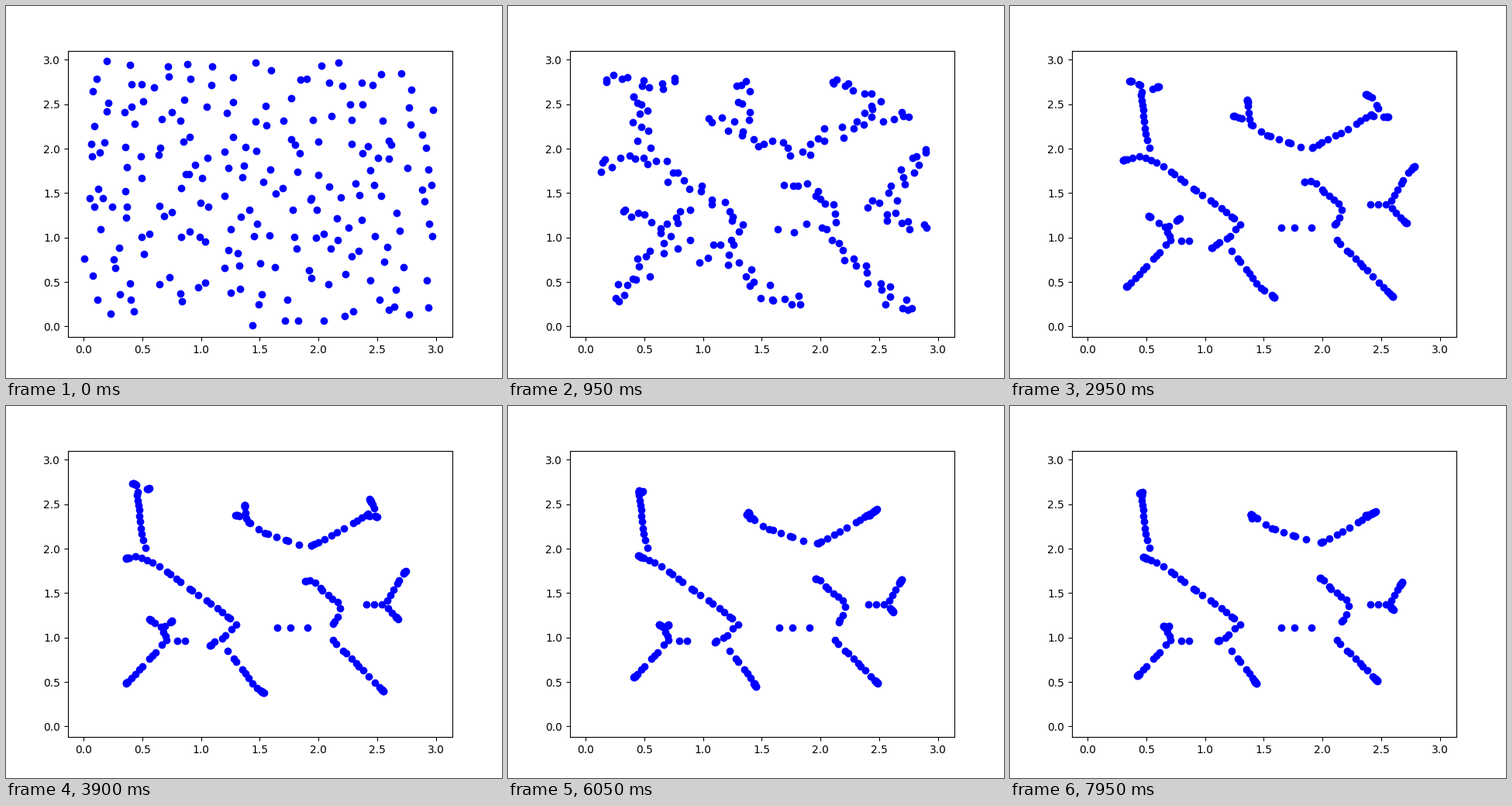
A matplotlib script for the animation above (8000 ms loop, 640 by 480 pixels).

```python
import numpy as np
import matplotlib.pyplot as plt
from matplotlib.animation import FuncAnimation

FRAMES, STEP = 160, 50
SPAN = 8.0     # seconds over which the strands contract
SETTLE = 1.75  # seconds until the scattered dots have reached their strands

rng = np.random.default_rng(7)
strands = []


def strand(*path, head=0, tail=0, drift=(0, 0), gap=0.065):
    """Add a line of dots along path; its ends retreat by head and tail."""
    x, y = np.array(path).T
    length = np.concatenate([[0], np.cumsum(np.hypot(np.diff(x), np.diff(y)))])
    total = length[-1]
    n = max(2, round(total / gap))
    s = (np.arange(n) + rng.uniform(0.1, 0.9, n)) / n * total

    def at(e):
        # a retreating end sweeps the dots before it into a tight clump
        a, b = head * e, total - tail * e
        u = np.clip(s, a, b)
        u += 0.08 * (s - u)
        return np.column_stack([np.interp(u, length, x) + drift[0] * e,
                                np.interp(u, length, y) + drift[1] * e])

    strands.append(at)


# upper left
strand((.08, 2.74), (.28, 2.80), (.45, 2.72), (.47, 2.48), (.49, 2.2),
       (.53, 2.0), head=.53)
strand((.82, 2.80), (.44, 2.62), head=.42)
strand((.04, 1.78), (.45, 1.92), (.64, 1.81), (.87, 1.58), (1.2, 1.27),
       (1.32, 1.12), head=.5)
# lower left
strand((1.30, 1.10), (1.22, .98), (1.14, .93), (.98, .76), tail=.25,
       drift=(-.03, .03))
strand((1.22, .86), (1.40, .56), (1.45, .45), (1.6, .32), (1.92, .27), tail=.6)
strand((.28, 1.30), (.50, 1.26), (.66, 1.12), (.71, .98), (.45, .60),
       (.30, .40), (.30, .22), head=.45, tail=.42)
strand((.92, 1.34), (.66, 1.10), head=.33)
strand((.79, .96), (.92, .96))
# upper right
strand((1.32, 2.80), (1.34, 2.5), (1.36, 2.3), head=.47, drift=(.04, .02))
strand((1.0, 2.32), (1.25, 2.22), (1.45, 2.04), (1.78, 1.89), head=.35,
       drift=(.10, .20))
strand((1.80, 1.93), (2.18, 2.19), (2.46, 2.42), (2.40, 2.56), (2.02, 2.82),
       head=.2, tail=.72, drift=(.03, .03))
strand((2.8, 2.32), (2.36, 2.38), head=.44)
# lower right
strand((1.64, 1.55), (1.84, 1.58), (1.93, 1.45), (2.05, 1.33), (2.08, 1.23),
       (1.99, 1.04), head=.2, drift=(.15, .09))
strand((1.57, 1.11), (1.96, 1.11), gap=.13)
strand((2.10, 1.0), (2.40, .60), (2.66, .25), (2.85, .12), tail=.6)
strand((2.40, 1.37), (2.56, 1.37), (2.72, 1.72), (2.98, 2.06), tail=.58)
strand((2.56, 1.37), (2.71, 1.16), (3.0, 1.12), tail=.52)


def gather(t):
    e = 1 - (1 - t / SPAN) ** 2
    return np.concatenate([at(e) for at in strands])


def scatter(points, reach=0.23, rounds=60):
    """Push the dots apart until they fill the square."""
    p = points + rng.normal(0, 0.05, points.shape)
    for _ in range(rounds):
        delta = p[:, None] - p[None]
        dist = np.hypot(delta[..., 0], delta[..., 1]) + 1e-9
        push = np.clip(1 - dist / reach, 0, None) / dist
        p += 0.05 * (delta * push[..., None]).sum(1)
        p = np.clip(p, 0.06, 2.93)
    p = np.abs(p + rng.normal(0, 0.07, p.shape))
    return 2.99 - np.abs(2.99 - p)


offset = scatter(gather(0)) - gather(0)


def positions(t):
    return gather(t) + offset * max(0, 1 - t / SETTLE) ** 2


fig, ax = plt.subplots(figsize=(6.4, 4.8), dpi=100)
ax.set_xlim(-0.13, 3.138)
ax.set_ylim(-0.12, 3.102)
cloud, = ax.plot(*positions(0).T, "bo")


def draw(i):
    cloud.set_data(*positions(i * STEP / 1000).T)
    return cloud,


anim = FuncAnimation(fig, draw, frames=FRAMES, interval=STEP, repeat=True)
plt.show()
```
